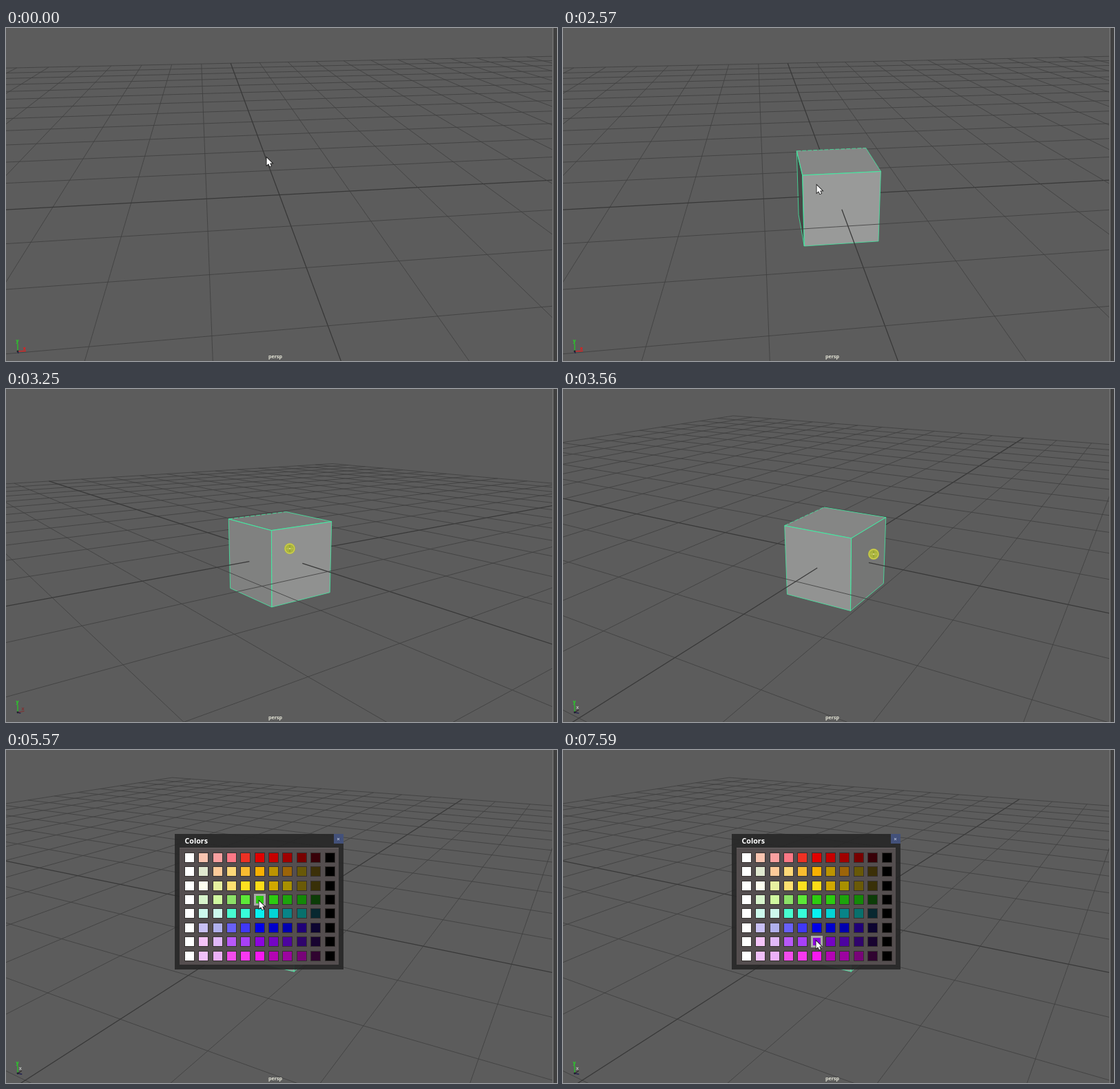
Recreate the animation shown at these times as an HTML page with a canvas. Size 800x484 px, loop 7920 ms.

```html
<!DOCTYPE html>
<html lang="en">
<head>
<meta charset="utf-8">
<title>Viewport</title>
<style>
html, body { margin: 0; width: 100%; height: 100%; overflow: hidden; background: #5c5c5c; }
canvas { display: block; }
</style>
</head>
<body>
<canvas id="stage" width="800" height="484"></canvas>
<script>
const ctx = document.getElementById("stage").getContext("2d");
const LOOP = 7920, VIEW_W = 793, CX = 397, CY = 242.5;
const FOCAL = 771, DIST = 7.35, GRID = 12;
const HUB = { x: 391, y: 218 };

// Bursts of motion: start, end, number of updates
const BURSTS = [[700, 1000, 5], [1160, 1330, 3], [2260, 2730, 7], [2880, 3640, 11], [3710, 3870, 3],
  [4190, 4720, 8], [4880, 5420, 8], [5570, 6350, 11], [6490, 6970, 7]];

const POINTER = [[640, 378, 188], [850, 356, 171], [1000, 378, 166], [1160, 378, 158], [1330, 378, 136],
  [2200, 378, 136], [2420, 383, 180], [2570, 368, 228], [2730, 363, 240], [2880, 363, 241],
  [3260, 412, 232], [3564, 451, 240], [3640, 452, 240], [3710, 425, 231], [3790, 391, 218],
  [4120, 391, 218], [4640, 346, 168], [4720, 336, 217], [4820, 336, 217], [5110, 268, 215],
  [5420, 367, 219], [5720, 367, 219], [6100, 387, 250], [6350, 387, 277], [6440, 387, 277], [6970, 367, 277]];
const ORBIT = [[2880, 8.06, 22.5], [3260, 37, 14.15], [3564, 60, 21.36], [3640, 60.6, 21.27]];

function stepped(t) {
  const burst = BURSTS.findLast(b => t >= b[0]);
  if (!burst || t >= burst[1]) return t;
  const [start, end, count] = burst, gap = (end - start) / (count - 1);
  return start + Math.floor((t - start) / gap + 0.2) * gap;
}

function track(keys, t) {
  if (t <= keys[0][0]) return keys[0].slice(1);
  const i = keys.findIndex(k => k[0] > t);
  if (i < 0) return keys[keys.length - 1].slice(1);
  const a = keys[i - 1], b = keys[i], k = (t - a[0]) / (b[0] - a[0]);
  return [a[1] + (b[1] - a[1]) * k, a[2] + (b[2] - a[2]) * k];
}

function rect(x, y, w, h, color) {
  ctx.fillStyle = color;
  ctx.fillRect(x, y, w, h);
}

function disc(x, y, r, color) {
  ctx.fillStyle = color;
  ctx.beginPath();
  ctx.arc(x, y, r, 0, 7);
  ctx.fill();
}

function line(a, b, color, width) {
  ctx.strokeStyle = color;
  ctx.lineWidth = width;
  ctx.beginPath();
  ctx.moveTo(a[0], a[1]);
  ctx.lineTo(b[0], b[1]);
  ctx.stroke();
}

function label(text, x, y, size, color, align = "center", weight = "bold") {
  ctx.font = `${weight} ${size}px "Open Sans", sans-serif`;
  ctx.textAlign = align;
  ctx.textBaseline = "alphabetic";
  ctx.fillStyle = color;
  ctx.fillText(text, x, y);
}

function makeCamera([yaw, pitch]) {
  const rad = Math.PI / 180;
  const c = Math.cos(yaw * rad), s = Math.sin(yaw * rad);
  const cp = Math.cos(pitch * rad), sp = Math.sin(pitch * rad);
  const depth = ([x, y, z]) => DIST + (x * s - z * c) * cp - y * sp;
  const project = p => {
    const [x, y, z] = p, k = FOCAL / depth(p);
    return [CX + (x * c + z * s) * k, CY - ((x * s - z * c) * sp + y * cp) * k];
  };
  return { c, s, cp, sp, depth, project, yaw };
}

function segment(cam, a, b, color, width) {
  const near = 0.2, da = cam.depth(a), db = cam.depth(b);
  if (da < near && db < near) return;
  const cut = (p, q, dp, dq) => dp >= near ? p : p.map((v, i) => v + (q[i] - v) * (near - dp) / (dq - dp));
  line(cam.project(cut(a, b, da, db)), cam.project(cut(b, a, db, da)), color, width);
}

// The front part lies beyond a visible side of the cube and can never be hidden by it.
function drawGrid(cam, front) {
  for (let i = -GRID; i <= GRID; i++) {
    const color = i ? "#404040" : "#383838", width = i ? 0.85 : 1.25;
    const zSpan = i < 0 ? [-GRID, GRID] : front ? [0.5, GRID] : [-GRID, 0.5];
    const xSpan = i > 0 ? [-GRID, GRID] : front ? [-GRID, -0.5] : [-0.5, GRID];
    if (front || i >= 0) segment(cam, [i, 0, zSpan[0]], [i, 0, zSpan[1]], color, width);
    if (front || i <= 0) segment(cam, [xSpan[0], 0, i], [xSpan[1], 0, i], color, width);
  }
}

function drawCube(cam) {
  const h = 0.5, shade = v => Math.round(159 * Math.max(v, 0) ** 0.4);
  const faces = [
    [[[-h, h, -h], [h, h, -h], [h, h, h], [-h, h, h]], shade(cam.sp + 0.27)],
    [[[-h, h, h], [h, h, h], [h, -h, h], [-h, -h, h]], shade(cam.c * cam.cp)],
    [[[-h, h, -h], [-h, h, h], [-h, -h, h], [-h, -h, -h]], shade(cam.s * cam.cp)]
  ];
  for (const [corners, g] of faces) {
    ctx.fillStyle = `rgb(${g},${g + 1},${g})`;
    ctx.beginPath();
    corners.forEach(p => ctx.lineTo(...cam.project(p)));
    ctx.fill();
  }
  for (const [corners] of faces)
    corners.forEach((p, i) => {
      const q = corners[(i + 1) % 4];
      const back = p[1] > 0 && q[1] > 0 && p[2] + q[2] < -0.9;
      ctx.setLineDash(back ? [6, 2] : []);
      line(cam.project(p), cam.project(q), "#45eda4", 0.8);
    });
  ctx.setLineDash([]);
}

function drawGizmo(cam) {
  const o = [17, 470], len = 12;
  const x = [o[0] + cam.c * len, o[1] - cam.s * cam.sp * len];
  const z = [o[0] + cam.s * len * 0.6, o[1] + cam.c * cam.sp * len * 0.6];
  const xColor = cam.yaw < 20 ? "#f01818" : cam.yaw < 45 ? "#803030" : "#b8b8b8";
  line(o, z, "#202050", 1.4);
  line(o, x, cam.yaw < 45 ? xColor : "#302828", 1.2);
  line(o, [17, 458.5], "#20d020", 1.2);
  disc(17, 470, 1.4, "#202030");
  label("y", 16.5, 457, 7, "#20e020");
  label("x", x[0] - 2, x[1] - 1, 7, xColor);
}

function drawScene(cam, hasCube) {
  rect(0, 0, 800, 484, "#5c5c5c");
  ctx.save();
  ctx.beginPath();
  ctx.rect(0, 0, VIEW_W, 484);
  ctx.clip();
  drawGrid(cam, false);
  if (hasCube) drawCube(cam);
  drawGrid(cam, true);
  drawGizmo(cam);
  label("persp", 391, 480, 7.2, "#e6e6d8");
  ctx.restore();
  rect(793, 0, 2, 484, "#6c6c6c");
  rect(795, 0, 5, 484, "#404040");
}

const MARKS = [["Poly Cube", 320, 129, 117], ["Poly Sphere", 414, 151, 92], ["Poly Cylinder", 426, 175, 102],
  ["Poly Cone", 414, 199, 92], ["Poly Torus", 320, 220, 117], ["Poly Plane", 236, 199, 104],
  ["Poly Disc", 215, 175, 114], ["Poly Pipe", 236, 151, 104]];

function drawMarkingMenu(t, [px, py]) {
  const picked = t < 700 ? -1 : t < 920 ? 6 : t < 1730 ? 0 : -1;
  MARKS.forEach(([name, x, y, w], i) => {
    rect(x, y, w, 17, i === picked ? "#5285a6" : "#444");
    label(name, x + (w - 16) / 2, y + 12, 8.5, "#ddd", "center", "normal");
    ctx.strokeStyle = "#aaa";
    ctx.lineWidth = 1;
    ctx.strokeRect(x + w - 13.5, y + 4.5, 8, 8);
  });
  disc(378, 188, 2, "#222");
  line([378, 188], [px, py], "#222", 2);
}

// Offset, disc colour, then shapes: f fills and s strokes
const ICONS = [
  [-34, -82, "#6cbcfb", "f#25466f M-9-5H9V5H-9Z", "f#a9d4f4 M-7-2H-3V2H-7ZM-2-2H2V2H-2ZM3-2H7V2H3Z"],
  [-82, -34, "#6cbcfb", "f#f2f2f2 M-9-8H9V8H-9Z", "s#666 M-8-7H8V7H-8ZM-8-4H8M-4-1H2V4H-4Z", "f#48a868 M3 7L6 2L8 7Z"],
  [34, -82, "#68763a", "s#2d9b28 M-7-5L-1-2L5-7M-5 6L1 1L7 4M3-5L6 0", "s#d0a040 M-7 2L0-1L2 7"],
  [82, -34, "#68763a", "s#d8943c M-7-3L0-5L5 0L-4 1L5 5", "f#e8b05c M-4-5H2V0H-4Z"],
  [82, 34, "#8d5150", "s#d89548 M-7-4L0-6L6-2M-5 5L1 1L7 5", "f#3c3030 M-5-3H0V3H-5Z"],
  [34, 82, "#8d5150", "f#eee M-8-8H8V8H-8Z", "f#444 M-6-5H-1V0H-6ZM1-5H6V-3H1ZM-6 2H-2V5H-6ZM1 0H6V5H1Z"],
  [-34, 82, "#714084", "f#3fa4e8 M-5-5H5V5H-5Z"],
  [-82, 34, "#714084", "s#e8e0ee M-5-1A4 4 0 1 1 3-1A4 4 0 1 1-5-1M2 2L7 7"],
  [0, -62, "#353536", "f#a8641c M-8 0Q-2-7 5-2L8-5V4L5 1Q-2 6-8 0Z"],
  [48, -48, "#68763a", "f#1c8a24 M-4-8Q5-8 3 0Q5 6 0 8L-2 3Q-6 1-2-3Z", "s#e0c060 M2-4L7-5M2 3L7 4"],
  [61, 0, "#353536", "s#b8963f M-8 0H8M0-8V8M-5-4L5 5", "s#ccc M-6 5H6"],
  [48, 48, "#8d5150", "f#eee M-7-3Q-5-9-3-3L-2 6H-8ZM-2-4Q0-10 2-4L3 7H-3ZM4-3Q6-9 8-3L8 6H3Z"],
  [0, 62, "#353536", "f#3d9ad4 M-8 1Q-3-6 6-4L8 1L4 1L2 5Q-4 6-8 1Z", "f#17283a M-1 0H6V2H-1Z"],
  [-48, 48, "#714084", "f#e678a4 M-9-9H9V9H-9Z", "s#f4dce6 M-4-5L3-4L2 7", "s#704060 M-1-3L0 7"],
  [-61, 0, "#353536", "s#ccc M-4 0A4 4 0 1 1 4 0A4 4 0 1 1-4 0M0-7V-4M0 4V7M-7 0H-4M4 0H7M-5-5L-3-3M3 3L5 5M5-5L3-3M-3 3L-5 5"],
  [-48, -48, "#426c94", "f#31547c M-6-8H5V7H-6Z", "s#a8d0ec M-3-8V7M2-7V7M-6-4H5M-6 1H5"]
];

function drawIcon([dx, dy, color, ...shapes], hovered) {
  ctx.save();
  ctx.translate(HUB.x + dx, HUB.y + dy);
  disc(0, 0, 13.7, hovered ? "#b4b4b8" : color);
  ctx.lineWidth = 1.6;
  for (const shape of shapes) {
    const gap = shape.indexOf(" "), tint = shape.slice(1, gap), path = new Path2D(shape.slice(gap + 1));
    ctx.fillStyle = ctx.strokeStyle = tint;
    if (shape[0] === "f") ctx.fill(path); else ctx.stroke(path);
  }
  ctx.restore();
}

function drawRadialMenu(t, pointer) {
  const onGear = t >= 4720, onCam = !onGear && pointer[0] < 362;
  ctx.save();
  ctx.globalAlpha = t < 3780 ? 0.35 : t < 3860 ? 0.7 : 1;
  ctx.fillStyle = "#4d4d59";
  ctx.beginPath();
  for (let i = 0; i < 360; i++) {
    const a = i * Math.PI / 180, r = 81 + 25 * Math.abs(Math.sin(4 * a));
    ctx.lineTo(HUB.x + r * Math.cos(a), HUB.y + r * Math.sin(a));
  }
  ctx.fill();
  if (onGear && t < 5400) {
    disc(268, 216, 20.5, "#4d4d59");
    rect(268, 203, 45, 27, "#4d4d59");
    const hot = pointer[0] < 284;
    disc(268, 216, 13.7, hot ? "#b4b4b8" : "#353536");
    ["#e03030", "#30c030", "#3060e0", "#f0d030"].forEach((c, i) =>
      rect(262 + 7 * (i % 2), 210 + 7 * (i >> 1), 5, 5, c));
  }
  ICONS.forEach((icon, i) => drawIcon(icon, (i === 15 && onCam) || (i === 14 && onGear)));
  disc(HUB.x, HUB.y, 34.5, "#1d2b48");
  if (onCam || onGear) label(onGear ? "Colors" : "Go next cam", HUB.x - 0.5, 221, 7.9, "#f4f4f4");
  line([HUB.x, HUB.y], pointer, "#15171c", 2);
  ctx.restore();
}

const SWATCHES = [
  "f8c4b0 f9a0a0 fb7885 ee3124 e00000 c60000 a00000 780000 380008",
  "e0e8d0 fcca9a fcd878 f8bc30 f8b000 bc9400 9c6408 685808 3c3008",
  "fdfdf0 e6f0a0 fde070 fde020 fddc18 d0a800 a89000 6a5a08 383008",
  "d8f4cc d0f8a0 8ce068 5ce838 2ccc10 2ccc10 1ca40c 148808 0c3c08",
  "ccf8ec ccf8ec 48fcd0 38fcd8 08f0f0 04d4d4 088488 08706c 082830",
  "c8c0f4 b0b0ec 6860f8 4038f8 0000e8 0000cc 0000b0 200078 0c0430",
  "f4c4f8 e0b8f8 b858f8 a840f8 8c04e0 7404c4 4c04a0 30046c 180430",
  "f0c0f8 ecb0f8 f44cec f838f0 f818f0 b404b4 9c04a0 780478 300430"
].map(row => ["ffffff", ...row.split(" "), "000000"]);

function drawColors([px, py]) {
  rect(245, 122, 245, 197, "rgba(38,38,38,.9)");
  rect(252, 142, 231, 170, "#544e4f");
  rect(252, 142, 231, 1, "#686263");
  label("Colors", 259.5, 135.5, 10.7, "#fff", "left");
  rect(476, 122, 14, 14, "#43517a");
  line([481, 128], [484, 131], "#ccd4e8", 1);
  line([484, 128], [481, 131], "#ccd4e8", 1);
  SWATCHES.forEach((row, j) => row.forEach((color, i) => {
    const x = Math.round(265.8 + 20.37 * i), y = Math.round(156 + 20.37 * j);
    const hovered = Math.abs(px - x) < 9 && Math.abs(py - y) < 9;
    if (hovered) rect(x - 8, y - 8, 17, 17, "#a9aaa8");
    else rect(x - 7, y - 7, 15, 15, "#35302f");
    const r = hovered ? 5 : 6;
    rect(x - r, y - r, 2 * r + 1, 2 * r + 1, "#" + color);
  }));
}

const ARROW = new Path2D("M.5.5V11.5L3.2 9.2L5 13.3L7 12.4L5.2 8.5H8.6Z");

function drawPointer([x, y], tumbling) {
  if (tumbling) {
    disc(x, y, 8, "#a9b53e");
    ctx.strokeStyle = "#d2cf50";
    ctx.lineWidth = 1.2;
    ctx.beginPath();
    ctx.arc(x, y, 6.8, 0, 7);
    ctx.stroke();
    line([x - 5, y], [x + 5, y], "#c4c650", 1);
    line([x, y - 5], [x, y + 5], "#8c9230", 1);
    disc(x, y, 1, "#e4e4a0");
    return;
  }
  ctx.save();
  ctx.translate(Math.round(x), Math.round(y));
  ctx.strokeStyle = "#111";
  ctx.lineWidth = 1.6;
  ctx.stroke(ARROW);
  ctx.fillStyle = "#fff";
  ctx.fill(ARROW);
  ctx.restore();
}

function draw(now) {
  const t = stepped(now % LOOP);
  const pointer = track(POINTER, t);
  drawScene(makeCamera(track(ORBIT, t)), t >= 1880);
  if (t >= 150 && t < 1880) drawMarkingMenu(t, pointer);
  if (t >= 3710 && t < 5570) drawRadialMenu(t, pointer);
  if (t >= 5570) drawColors(pointer);
  drawPointer(pointer, t >= 2880 && t < 3710);
}

const startTime = performance.now();
function tick() {
  draw(performance.now() - startTime);
  requestAnimationFrame(tick);
}
tick();
</script>
</body>
</html>
```
